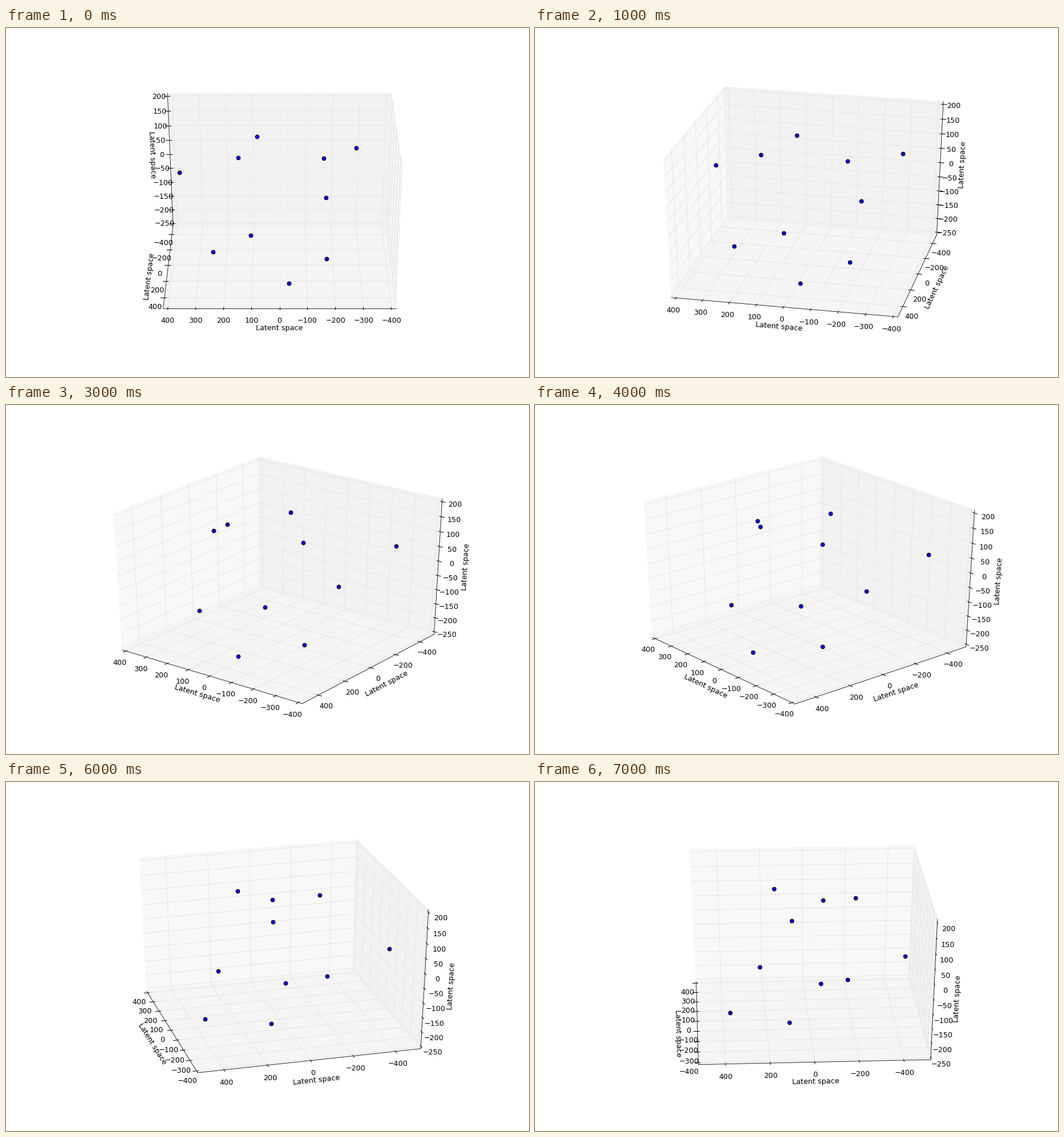
Animation of 917x611 px, one loop 8000 ms. Source, as a matplotlib script:

```python
import math

import numpy as np
import matplotlib.pyplot as plt
from matplotlib.animation import ArtistAnimation

W, H, DPI = 917, 611, 64
PT = W / 12 / DPI            # one point of a 12 inch wide figure
FRAMES, INTERVAL = 8, 1000
ELEV, AZIM, STEP = 30, 90, 360 / 29
DIST = 10
CENTER = np.array([0.125 + 0.775 * 95 / 185, 0.9 - 0.8 * 90 / 185]) * (W, H)
CENTER[1] = H * (1 - 0.1 - 0.8 * 95 / 185)
SCALE = np.array([0.775 * W, -0.8 * H]) / 0.185
HALF = 0.5 + 1 / 48          # half side of the padded unit cube
DELTA = 1 / 12
PER_POINT = 48 / (72 * (12 * 0.775 + 8 * 0.8))
TICK_GAP = 12 * PER_POINT * DELTA
LABEL_GAP = 26 * PER_POINT * DELTA

LOW = np.array([-400, -500, -250])
HIGH = np.array([400, 500, 200])
TICKS = [range(-400, 401, 100), range(-400, 401, 200), range(-250, 201, 50)]
PANES = ["0.95", "0.9", "0.925"]
SIDE = [1, 0, 0]             # direction in which each axis sits and ticks

POINTS = np.array([
    (82.6, -218.8, 132.5), (-287.4, -405.6, 50.1), (146.3, 147.3, 149.4),
    (-157, 85, 133), (366.8, -93.2, 42), (-171.7, -164.3, -63.5),
    (107.6, -66, -170.6), (241.4, 215.6, -150.6), (-173.6, 99.4, -208.6),
    (-33.8, 367, -218.5),
])

fig = plt.figure(figsize=(W / DPI, H / DPI), dpi=DPI, facecolor="white")
ax = fig.add_axes([0, 0, 1, 1])
ax.set_xlim(0, W)
ax.set_ylim(H, 0)
ax.set_autoscale_on(False)
ax.axis("off")


def unit(values, low, high):
    return (values - (low + high) / 2) / (high - low)


def make_view(azim):
    """Return the direction to the eye and a projection to pixels."""
    a, e = math.radians(azim), math.radians(ELEV)
    ca, sa, ce, se = math.cos(a), math.sin(a), math.cos(e), math.sin(e)
    eye = np.array([ce * ca, ce * sa, se])
    plane = np.array([[-sa, ca, 0], [-se * ca, -se * sa, ce]])

    def project(points):
        points = np.asarray(points, float)
        depth = DIST - points @ eye
        return CENTER + SCALE * (points @ plane.T) / depth[:, None]

    return eye, project


def with_value(point, i, value):
    point = np.array(point, float)
    point[i] = value
    return point


def text_angle(start, end):
    dx, dy = end - start
    angle = math.degrees(math.atan2(-dy, dx)) % 180
    return angle - 180 if angle > 90 else angle


def draw_view(azim):
    eye, project = make_view(azim)
    far = np.where(eye < 0, 1, -1)
    art = []

    def add(artist):
        artist.set_zorder(len(art) + 1)
        art.append(artist)

    def line(points, color, width):
        xy = project(points)
        add(ax.plot(xy[:, 0], xy[:, 1], color=color, lw=width * PT)[0])

    def text(point, label, va, angle=0):
        x, y = project([point])[0]
        add(ax.text(x, y, label, ha="center", va=va, rotation=angle,
                    fontsize=12 * PT, family="DejaVu Sans"))

    for i, shade in enumerate(PANES):
        j, k = (i + 1) % 3, (i + 2) % 3
        corners = []
        for u, v in ((-1, -1), (1, -1), (1, 1), (-1, 1)):
            corner = far * HALF
            corner[j], corner[k] = u * HALF, v * HALF
            corners.append(corner)
        xy = project(corners)
        add(ax.fill(xy[:, 0], xy[:, 1], fc=shade, ec=shade, alpha=0.5,
                    lw=PT)[0])

    for i in range(3):
        j, k = (i + 1) % 3, (i + 2) % 3
        side = SIDE[i]
        sign = with_value(far, side, -far[side])
        edge = sign * HALF
        ends = [edge, with_value(edge, i, -edge[i])]
        line(ends, "black", 0.75)

        middle = with_value(sign * (HALF + LABEL_GAP), i, 0)
        text(middle, "Latent space", "center", text_angle(*project(ends)))

        places = [unit(v, LOW[i], HIGH[i]) for v in TICKS[i]]
        for at in places:
            corner = with_value(far * HALF, i, at)
            line([with_value(corner, j, -corner[j]), corner,
                  with_value(corner, k, -corner[k])], "0.9", 1)

        for value, at in zip(TICKS[i], places):
            base = with_value(edge, i, at)
            shift = far[side] * DELTA
            line([with_value(base, side, base[side] + 0.1 * shift),
                  with_value(base, side, base[side] - 0.2 * shift)],
                 "black", 1)
            place = with_value(sign * (HALF + TICK_GAP), i, at)
            text(place, str(value).replace("-", "\u2212"), "top")

    xy = project(unit(POINTS, LOW, HIGH))
    add(ax.scatter(xy[:, 0], xy[:, 1], s=40 * PT ** 2, c="blue",
                   edgecolors="black", linewidths=PT))
    return art


views = [draw_view(AZIM + STEP * n) for n in range(FRAMES)]
anim = ArtistAnimation(fig, views, interval=INTERVAL, repeat=True,
                       repeat_delay=0, blit=False)
plt.show()
```
